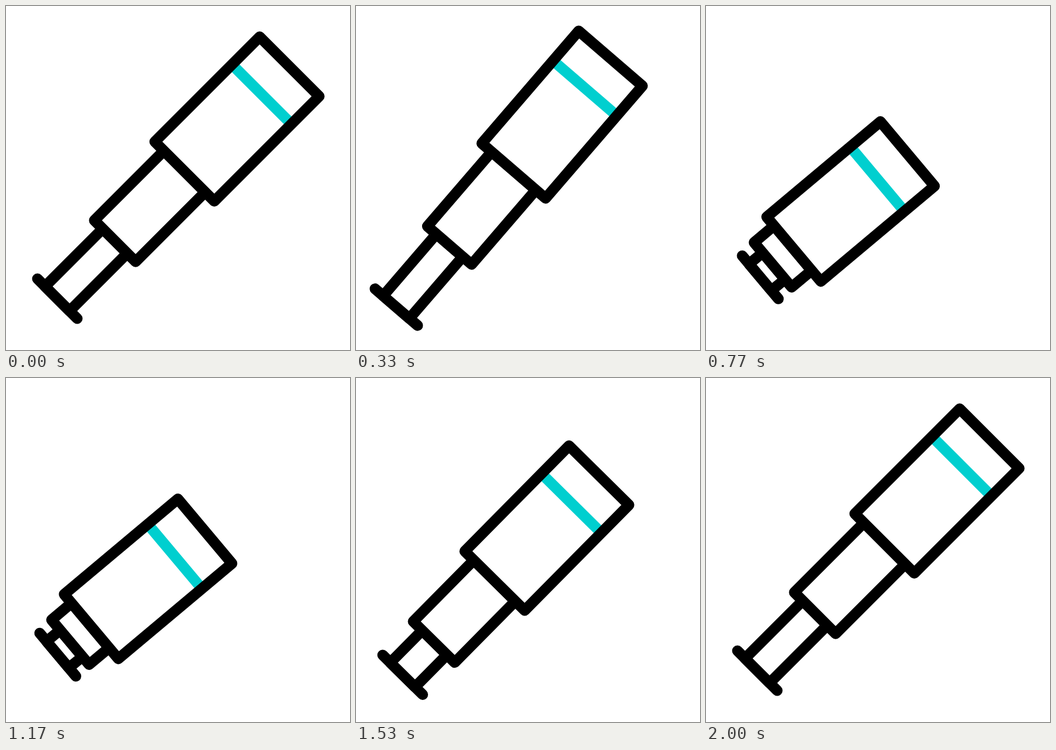
Recreate the animation shown at these times as an HTML page with a canvas. Size 640 px wide and 640 px high, loop 2300 ms.

```html
<!DOCTYPE html>
<html lang="en">
<head>
<meta charset="utf-8">
<title>Spyglass</title>
<style>
  html, body { margin: 0; width: 100%; height: 100%; overflow: hidden; background: #fff; }
  canvas { display: block; width: 100%; height: 100%; }
</style>
</head>
<body>
<canvas id="stage" width="640" height="640"></canvas>
<script>
const ctx = document.getElementById('stage').getContext('2d');
const LOOP = 2300, FPS = 30;
const EYE = { x: 95.5, y: 544.5, half: 52.3 };
const TUBE = 32.3, MID = 54.3, BODY = 78.3;
const BODY_LEN = 276, BAND = 73;
const DRIFT = 2.7; // sideways play of a fully closed section

// Linear 0..1 between frames a and b
const ramp = (f, a, b) => Math.min(1, Math.max(0, (f - a) / (b - a)));

function pose(f) {
  const back = ramp(f, 0, 6) - ramp(f, 40.2, 49.6);
  const lift = ramp(f, 9.3, 18.75) - ramp(f, 34, 40);
  const shutInner = ramp(f, 10, 19.5) - ramp(f, 41.9, 51.35);
  const shutOuter = ramp(f, 13.95, 23) - ramp(f, 38.1, 47.6);
  return {
    x: EYE.x - 22.6 * back + 28.1 * lift,
    y: EYE.y + 20.2 * back - 60 * lift,
    tilt: 45 - 5 * ramp(f, 0, 9.3) + 10 * ramp(f, 9.3, 18.75)
             - 10 * ramp(f, 40.95, 50.4) + 5 * ramp(f, 51.4, 60),
    inner: 151.7 - 118.9 * shutInner,
    outer: 183 - 134.5 * shutOuter,
    midY: -DRIFT * shutInner,
    bodyY: DRIFT * (shutOuter - shutInner)
  };
}

function line(x1, y1, x2, y2, color) {
  ctx.strokeStyle = color;
  ctx.beginPath();
  ctx.moveTo(x1, y1);
  ctx.lineTo(x2, y2);
  ctx.stroke();
}

function box(x, y, half, len, band) {
  ctx.fillStyle = '#fff';
  ctx.fillRect(x, y - half, len, half * 2);
  if (band) line(band, y - half, band, y + half, '#00cfcf');
  ctx.strokeStyle = '#000';
  ctx.strokeRect(x, y - half, len, half * 2);
}

function draw(f) {
  const p = pose(f);
  const mid = p.inner, rear = mid + p.outer;
  ctx.setTransform(1, 0, 0, 1, 0, 0);
  ctx.fillStyle = '#fff';
  ctx.fillRect(0, 0, 640, 640);

  // Local x runs from the eyepiece to the lens
  ctx.translate(p.x, p.y);
  ctx.rotate((p.tilt - 90) * Math.PI / 180);
  ctx.lineWidth = 20;
  ctx.lineJoin = ctx.lineCap = 'round';

  line(0, -EYE.half, 0, EYE.half, '#000');
  ctx.lineCap = 'butt';
  box(0, 0, TUBE, mid);
  box(mid, p.midY, MID, p.outer);
  box(rear, p.bodyY, BODY, BODY_LEN, rear + BODY_LEN - BAND);
}

function tick() {
  const t = performance.now() % LOOP;
  draw(Math.floor((t + 4) * FPS / 1000));
  requestAnimationFrame(tick);
}
tick();
</script>
</body>
</html>
```
